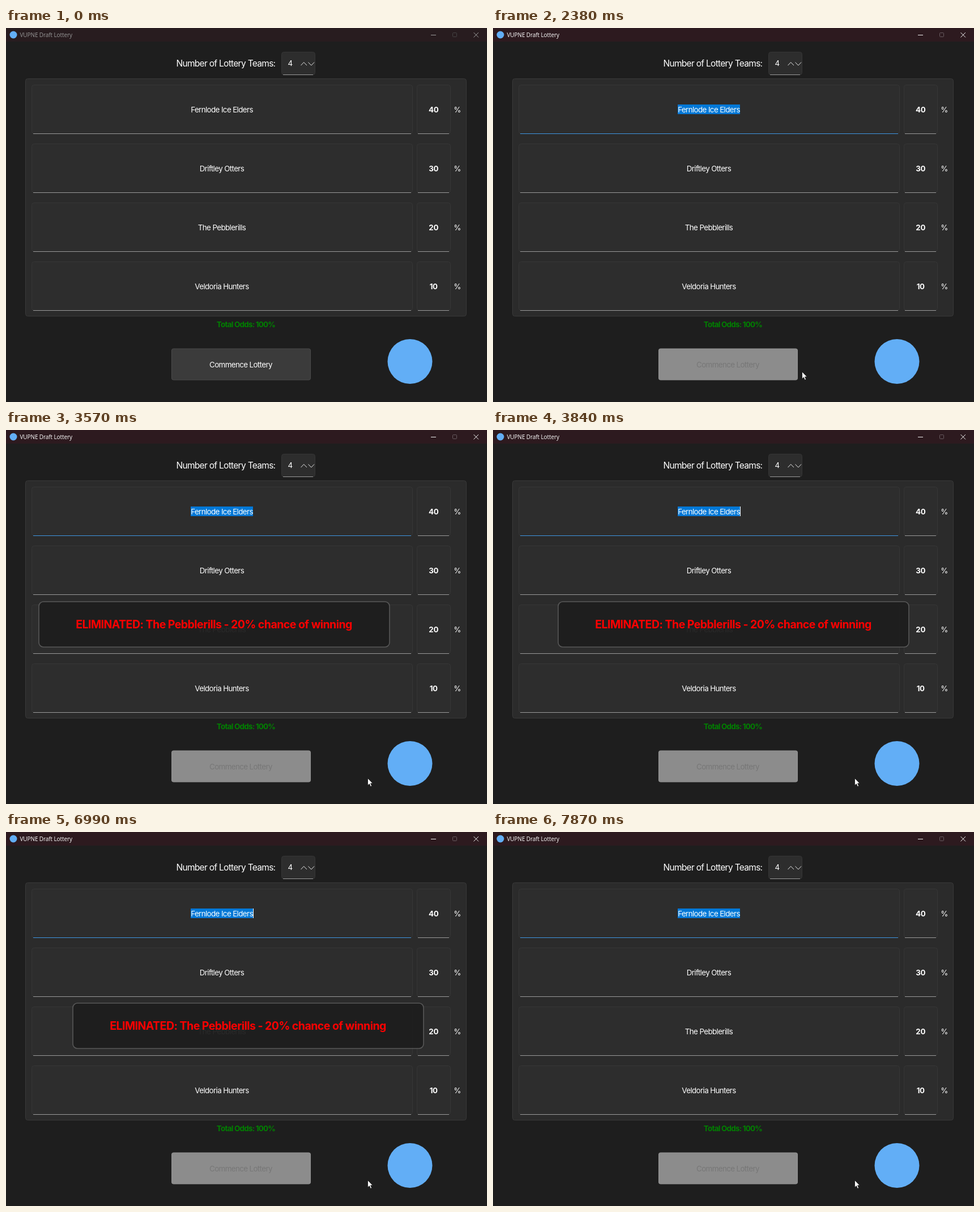
An HTML page for the animation above (8 s loop, 849 by 660 pixels).

```html
<!DOCTYPE html>
<html lang="en">
<head>
<meta charset="utf-8">
<title>Draft Lottery</title>
<style>
  html, body { margin: 0; width: 100%; height: 100%; overflow: hidden; background: #1e1e1e; }
  svg { display: block; width: 849px; height: 660px; }
  text {
    font: 13.33px Inter, "Open Sans", sans-serif;
    font-optical-sizing: none;
    letter-spacing: -.6px;
    fill: #fff;
  }
  .mid { text-anchor: middle; }
  .bold { font-weight: 700; letter-spacing: -.3px; }
  #title { font: 10px "Open Sans", sans-serif; letter-spacing: -.1px; }
  #label { font-size: 15.5px; letter-spacing: -.7px; }
  #total { font-weight: 700; letter-spacing: -.72px; fill: #008000; }
  #notice { font-size: 19.5px; font-weight: 700; letter-spacing: -.53px; fill: #f00; }
  .field { fill: #2d2d2d; stroke: #363636; }
  .rule { fill: #9a9a9a; }
  .line { fill: none; stroke: #e4e4e4; }
</style>
</head>
<body>
<svg viewBox="0 0 849 660">
  <rect width="849" height="660" fill="#1e1e1e"/>
  <rect id="bar" width="849" height="24"/>
  <circle cx="13" cy="12" r="6.5" fill="#62aef6"/>
  <text id="title" x="24.5" y="16">VUPNE Draft Lottery</text>
  <path id="controls" class="line" d="M750 12.5H759M825.5 8L834 16.5M834 8L825.5 16.5"/>
  <rect id="maximise" class="line" x="788.5" y="8.5" width="7" height="7" rx="1"/>

  <text id="label" x="300.5" y="68">Number of Lottery Teams:</text>
  <rect class="field" x="486.5" y="42.5" width="59" height="40" rx="4"/>
  <rect class="rule" x="489" y="82" width="53" height="1"/>
  <text x="497.5" y="67">4</text>
  <path class="line" d="M520.5 66L525.7 60.5L531 66M533.5 60.5L538.8 66L544 60.5"/>

  <rect x="34.5" y="89.5" width="778" height="419" rx="4" fill="#2b2b2b" stroke="#393939"/>
  <g id="rows"></g>
  <text id="total" class="mid" x="423.5" y="528">Total Odds: 100%</text>

  <rect id="button" x="292.5" y="566" width="245" height="55" rx="3"/>
  <text id="caption" class="mid" x="414.5" y="598.5">Commence Lottery</text>
  <circle cx="713" cy="588.5" r="39.5" fill="#62aef6"/>

  <g id="banner">
    <rect x="1" y="1" width="619" height="80" rx="8" fill="#1e1e1e" fill-opacity=".95" stroke="#585858" stroke-width="1.6"/>
    <text id="notice" class="mid" x="310" y="48">ELIMINATED: The Pebblerills - 20% chance of winning</text>
  </g>
  <path id="cursor" d="M.5 .5V13.2L3.4 10.5L5.4 15.2L7.6 14.2L5.6 9.7H9.4Z" fill="#fff" stroke="#111" stroke-width=".8"/>
</svg>
<script>
const LOOP = 8000, CLICK = 1630, FOCUS = 1750;
const $ = id => document.getElementById(id);
const set = (id, name, value) => $(id).setAttribute(name, value);
const clamp = v => Math.max(0, Math.min(1, v));
const span = (t, from, length) => clamp((t - from) / length);
const lerp = (a, b, k) => a + (b - a) * k;
const smooth = k => k * k * (3 - 2 * k);
const outCubic = k => 1 - (1 - k) ** 3;
const mix = (a, b, k) => `rgb(${a.map((v, i) => Math.round(lerp(v, b[i], k)))})`;
const grey = v => [v, v, v];

const teams = [
  ["Fernlode Ice Elders", 40],
  ["Driftley Otters", 30],
  ["The Pebblerills", 20],
  ["Veldoria Hunters", 10]
];

$("rows").innerHTML = teams.map(([name, odds], i) => {
  const y = 100 + i * 104;
  const marks = i ? "" : `
    <rect id="selection" x="326" y="135" width="110" height="17" fill="#0078d7"/>
    <rect id="caret" x="436" y="135" width="1" height="17" fill="#fff"/>`;
  return `
    <rect class="field" x="45.5" y="${y + .5}" width="672" height="86" rx="4"/>
    <rect class="rule" id="rule${i}" x="48" y="${y + 86}" width="667" height="1"/>
    <rect class="field" x="725.5" y="${y + .5}" width="59" height="86" rx="4"/>
    <rect class="rule" x="727" y="${y + 86}" width="55" height="1"/>${marks}
    <text class="mid" x="381" y="${y + 48.5}">${name}</text>
    <text class="mid bold" x="754.7" y="${y + 48.5}">${odds}</text>
    <text class="mid" x="796.5" y="${y + 48.5}">%</text>`;
}).join("");

function cursorAt(t) {
  const enter = smooth(span(t, 790, 760));
  const leave = smooth(span(t, 2110, 620));
  return [
    lerp(lerp(719, 481, enter), 638, leave),
    lerp(lerp(661, 601, enter), 614, leave)
  ].map(Math.round);
}

function bannerAt(t) {
  const enter = outCubic(span(t, 3170, 700));
  const exit = span(t, 6884, 700) ** 3;
  return [
    lerp(lerp(-621, 114, enter), 849, exit),
    lerp(302, 32, exit)
  ].map(Math.round);
}

function caretOn(t) {
  return t >= FOCUS && Math.floor((t - 1595) / 529) % 2 === 0;
}

function draw(t) {
  const wake = span(t, CLICK, 250);
  const fade = 1 - span(t, 0, 150);
  const tint = Math.max(wake, .6 * fade);
  const ink = Math.max(wake, .08 * fade);
  set("bar", "fill", mix(grey(32), [45, 26, 31], tint));
  $("title").style.fill = mix(grey(143), grey(255), ink);
  $("controls").style.stroke = mix(grey(150), grey(240), ink);
  $("maximise").style.stroke = mix(grey(66), [104, 92, 96], ink);

  const focused = t >= FOCUS;
  $("rule0").style.fill = focused ? "#3f97e3" : "";
  set("selection", "opacity", focused ? 1 : 0);
  set("caret", "opacity", caretOn(t) ? 1 : 0);

  const [x, y] = cursorAt(t);
  const lit = focused || (x < 538 && y < 621);
  set("button", "fill", lit ? "#8c8c8c" : "#3b3b3b");
  set("button", "stroke", lit ? "#939393" : "#4b4b4b");
  $("caption").style.fill = focused ? "#777" : "#fff";
  set("cursor", "transform", `translate(${x} ${y})`);
  set("banner", "transform", `translate(${bannerAt(t).join(" ")})`);
}

const start = performance.now();
function tick() {
  draw((performance.now() - start) % LOOP);
  requestAnimationFrame(tick);
}
tick();
</script>
</body>
</html>
```
